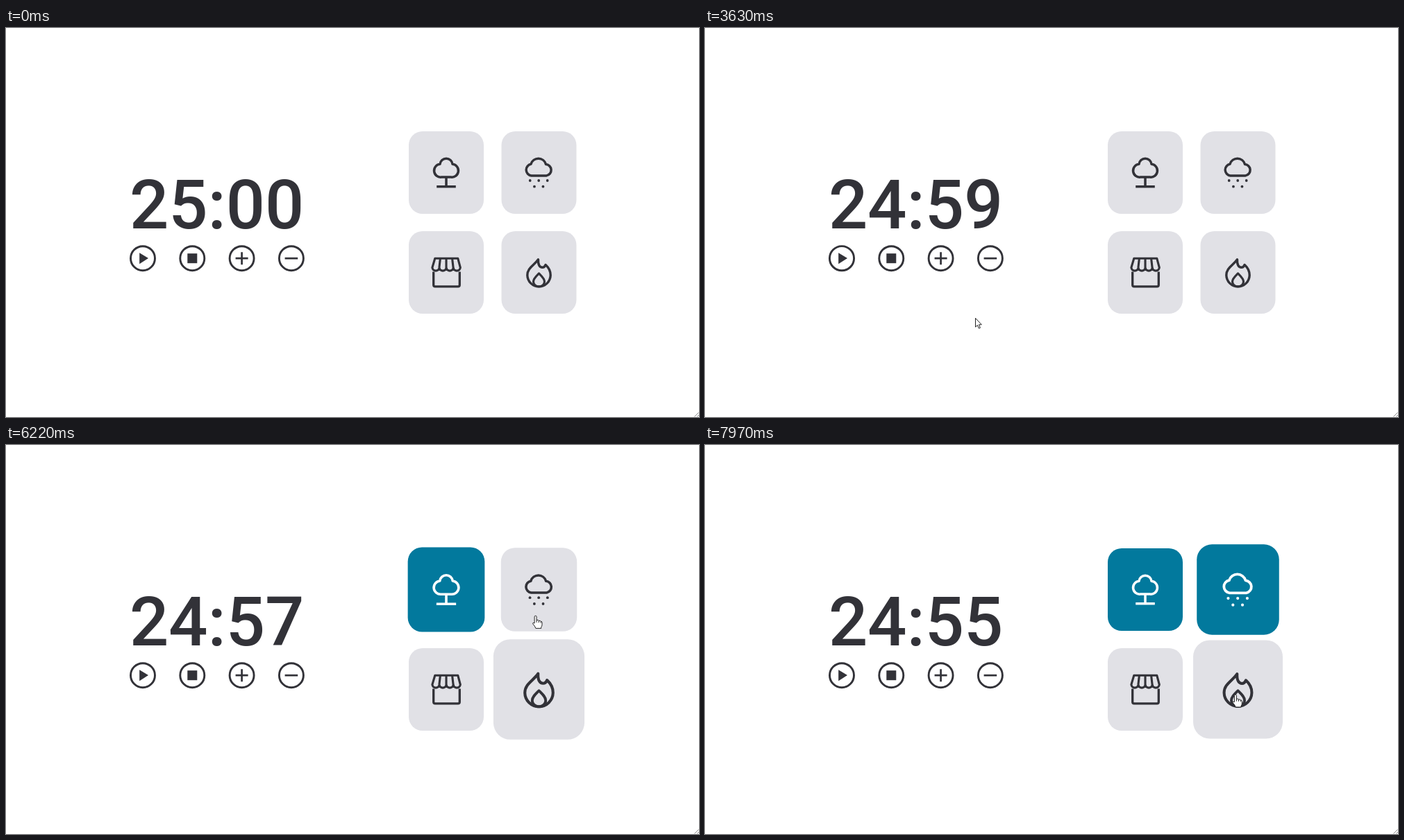
Write an HTML page with a canvas that moves like this. It is 998 by 561 pixels and loops after 8 s.

```html
<!DOCTYPE html>
<html lang="en">
<head>
<meta charset="utf-8">
<title>Focus timer</title>
<style>
html, body { margin: 0; width: 100%; height: 100%; overflow: hidden; background: #fff; }
#clock {
  position: absolute; left: 178px; top: 206px;
  font: 500 99px/99px Roboto, sans-serif;
  color: #323238; white-space: nowrap;
}
canvas { position: absolute; left: 0; top: 0; display: block; }
</style>
</head>
<body>
<div id="clock">25:00</div>
<canvas id="stage" width="998" height="561"></canvas>
<script>
const LOOP = 8000, FADE = 800, GROW = .3;
const FIRST_TICK = 3615, TICK = 1035;
const INK = '#323238', GRAY = [225, 225, 230], TEAL = [2, 121, 157];
const ctx = document.getElementById('stage').getContext('2d');
const clock = document.getElementById('clock');

// Hover lists alternate enter and leave times
const cards = [
  { icon: tree, hover: [4366, 5700], click: 5322 },
  { icon: snow, hover: [6170, 7654], click: 7218 },
  { icon: store, hover: [] },
  { icon: fire, hover: [5750, 6150, 7670] }
].map((card, i) => ({ ...card, x: 634 + 133.5 * (i % 2), y: 208.5 + 144 * (i >> 1) }));

const buttons = [play, stop, plus, minus].map((icon, i) => ({
  icon, x: 197 + 71.3 * i, y: 332.2,
  hover: icon === play ? [1140, 2000, 2160, 2960] : []
}));

// Pointer glides: start, end, goal, sideways bend of the path
const origin = { x: 361, y: 465 };
const glides = [
  { from: 430, to: 1060, x: 186, y: 298 },
  { from: 1060, to: 1450, x: 193, y: 337, bend: -14 },
  { from: 1700, to: 2060, x: 223, y: 337 },
  { from: 2100, to: 2450, x: 200, y: 337 },
  { from: 2900, to: 3300, x: 443, y: 508 },
  { from: 3320, to: 3630, x: 389, y: 418 },
  { from: 3900, to: 4700, x: 652, y: 238, bend: 60 },
  { from: 4800, to: 5600, x: 657, y: 266 },
  { from: 5640, to: 5950, x: 768, y: 402 },
  { from: 5960, to: 6290, x: 762, y: 226 },
  { from: 7400, to: 7900, x: 764, y: 360 }
];

const clamp = v => Math.max(0, Math.min(1, v));
const mix = (a, b, k) => a + (b - a) * k;
const smooth = k => k * k * (3 - 2 * k);

// cubic-bezier(.25, .1, .25, 1)
function ease(p) {
  p = clamp(p);
  let lo = 0, hi = 1, s = p;
  for (let i = 0; i < 20; i++) {
    s = (lo + hi) / 2;
    const x = .75 * s * (1 - s) + s * s * s;
    if (x < p) lo = s; else hi = s;
  }
  return .3 * s * (1 - s) * (1 - s) + 3 * s * s * (1 - s) + s * s * s;
}

// Hover amount; a reversed transition is shortened by the way covered
function amount(times, t) {
  let value = 0;
  for (let i = 0; i < times.length && times[i] <= t; i++) {
    const goal = 1 - i % 2;
    const end = Math.min(t, times[i + 1] || t);
    const span = FADE * Math.abs(goal - value);
    if (span) value = mix(value, goal, ease((end - times[i]) / span));
  }
  return value;
}

const isOver = (item, t) => item.hover.filter(h => h <= t).length % 2 === 1;

function pointerAt(t) {
  let p = origin;
  for (const g of glides) {
    if (t < g.from) break;
    const k = smooth(clamp((t - g.from) / (g.to - g.from)));
    const dx = g.x - p.x, dy = g.y - p.y;
    const arc = (g.bend || 0) * Math.sin(Math.PI * k) / Math.hypot(dx, dy);
    p = { x: p.x + dx * k - dy * arc, y: p.y + dy * k + dx * arc };
  }
  return p;
}

function stroke(d, width) {
  ctx.lineWidth = width;
  ctx.stroke(new Path2D(d));
}

function dot(x, y, r) {
  ctx.beginPath();
  ctx.arc(x, y, r, 0, Math.PI * 2);
  ctx.fill();
}

function tree() {
  stroke('M-7 6.6A9.45 9.45 0 0 1-9-12.2A9.05 9.05 0 0 1 9-12.2A9.45 9.45 0 0 1 7 6.6Z', 3.5);
  stroke('M0 6.6V20M-13.8 20.2H13.8', 3.5);
}

function snow() {
  stroke('M-11 4.4A8.4 8.4 0 0 1-11.5-12.2A11.2 11.2 0 0 1 10-12A8.3 8.3 0 0 1 11 4.4Z', 3.5);
  for (let i = 0; i < 5; i++) dot(-12.8 + 6.25 * i, i % 2 ? 20.2 : 11.5, 1.9);
}

function store() {
  stroke('M-18.3-1V18Q-18.3 20.3-16 20.3H17Q19.3 20.3 19.3 18V-1', 3.3);
  let d = 'M-16.2-20.2H16.8L20.3-7';
  for (let i = 0; i < 4; i++) d += 'a5.1 5.4 0 0 1-10.1 0';
  d += 'Z';
  for (const x of [-1, 0, 1]) d += `M${x * 8.6}-20L${x * 10.1}-7`;
  stroke(d, 3.1);
}

function fire() {
  stroke('M0 20.4A16.7 16.7 0 0 1-16.7 4C-16.7-6.5-7-10-1-18.7C-1.5-11 1-7.2 5-7.2' +
    'Q8-7.2 9.6-11C14-7 16.7-2 16.7 4A16.7 16.7 0 0 1 0 20.4Z', 3.4);
  stroke('M0 1.5C4 5.5 8 9 8 13.2A8 7.3 0 0 1-8 13.2C-8 9-4 5.5 0 1.5Z', 3.2);
}

function play() { ctx.fill(new Path2D('M-4.8-8L8-.2L-4.8 8Z')); }
function stop() { ctx.fillRect(-7, -7, 14, 14); }
function plus() { stroke('M-9 0H9M0-9V9', 2.7); }
function minus() { stroke('M-9.3 0H9.3', 2.7); }

function at(x, y, scale, draw) {
  ctx.save();
  ctx.translate(x, y);
  ctx.scale(scale, scale);
  draw();
  ctx.restore();
}

function drawItem(item, t, body) {
  at(item.x, item.y, 1 + GROW * amount(item.hover, t), () => {
    body(item, t);
    item.icon();
  });
}

function cardBody(card, t) {
  const on = t >= card.click;
  const k = on ? ease((t - card.click) / FADE) : 0;
  ctx.fillStyle = `rgb(${GRAY.map((c, i) => Math.round(mix(c, TEAL[i], k)))})`;
  ctx.beginPath();
  ctx.roundRect(-54, -59.5, 108, 119, 20);
  ctx.fill();
  ctx.fillStyle = ctx.strokeStyle = on ? '#fff' : INK;
}

function buttonBody() {
  ctx.fillStyle = ctx.strokeStyle = INK;
  ctx.lineWidth = 2.9;
  ctx.beginPath();
  ctx.arc(0, 0, 17.5, 0, Math.PI * 2);
  ctx.stroke();
}

const arrow = new Path2D('M.5.5V13.2L3.4 10.6L5.4 15.2L7.4 14.4L5.5 9.8H9.3Z');
const hand = new Path2D('M-1.6 1.4a1.5 1.5 0 0 1 3 0V6.2q2.9-.7 3.1.8q2.6-.5 2.9.9' +
  'q2-.1 1.9 1.8V13q0 1.8-1.3 3.2V18H.2q-.9-3-4.4-6.8q-.2-2.1 2.6-.6Z');
const knuckles = new Path2D('M1.4 6V9.5M4.5 7V9.8M7.4 8V10.2');

function drawPointer(t) {
  if (t < glides[0].from) return;
  const p = pointerAt(t);
  const over = [...cards, ...buttons].some(item => isOver(item, t));
  at(p.x, p.y, 1, () => {
    ctx.fillStyle = '#fff';
    ctx.strokeStyle = '#222';
    ctx.lineWidth = 1;
    const shape = over ? hand : arrow;
    ctx.fill(shape);
    ctx.stroke(shape);
    if (over) ctx.stroke(knuckles);
  });
}

function drawGrip() {
  ctx.strokeStyle = '#8a8a8a';
  stroke('M991.5 560.5L997.5 554.5M995.5 560.5L998 558', 1);
}

function render(now) {
  const t = now % LOOP;
  const left = 1500 - Math.max(0, Math.floor((t - FIRST_TICK) / TICK) + 1);
  const text = Math.floor(left / 60) + ':' + String(left % 60).padStart(2, '0');
  if (clock.textContent !== text) clock.textContent = text;

  ctx.clearRect(0, 0, 998, 561);
  ctx.lineJoin = 'round';
  cards.forEach(card => drawItem(card, t, cardBody));
  buttons.forEach(button => drawItem(button, t, buttonBody));
  drawGrip();
  drawPointer(t);
}

let start;
function loop(now) {
  if (start === undefined) start = now;
  render(Math.max(0, now - start));
  requestAnimationFrame(loop);
}
render(0);
requestAnimationFrame(loop);
</script>
</body>
</html>
```
